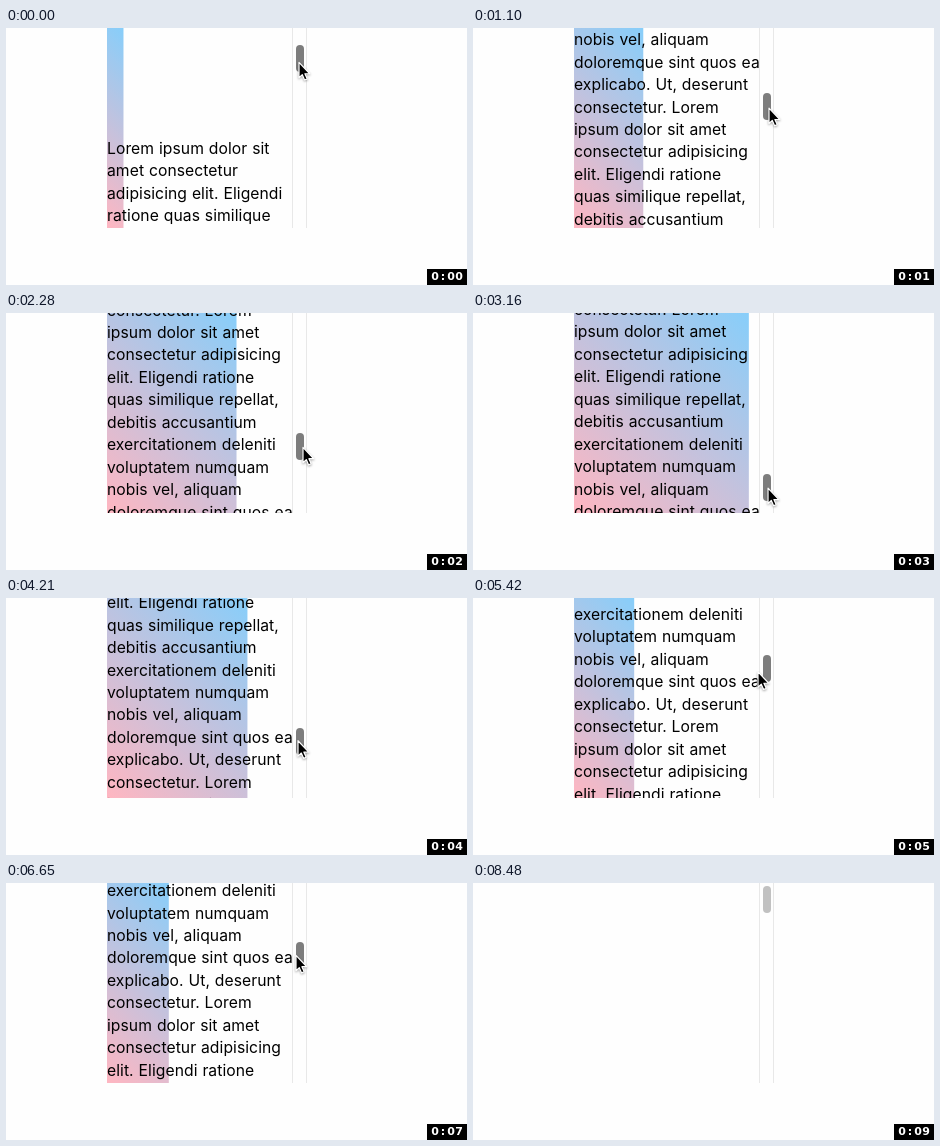
An HTML page that plays this animation: 461x257 px, repeating every 8870 ms.

```html
<!DOCTYPE html>
<html lang="en">
<head>
<meta charset="utf-8">
<title>Scroll-driven width</title>
<style>
  html, body { margin: 0; width: 100%; height: 100%; overflow: hidden; background: #fefefe; }
  svg { display: block; }
  #copy { font: 15.7px Inter, sans-serif; letter-spacing: .06px; word-spacing: .4px; }
  #cursor { filter: drop-shadow(0 1px 1px rgba(0, 0, 0, .35)); }
  #clock { font: bold 11px "DejaVu Sans", sans-serif; fill: #fff; text-anchor: middle; }
</style>
</head>
<body>
<svg width="461" height="257" viewBox="0 0 461 257">
  <defs>
    <linearGradient id="sky" gradientUnits="userSpaceOnUse">
      <stop offset="0" stop-color="#ffb6c1"/>
      <stop offset="1" stop-color="#87cefa"/>
    </linearGradient>
    <clipPath id="view"><rect x="100" width="186" height="200"/></clipPath>
  </defs>
  <rect width="461" height="257" fill="#fefefe"/>
  <rect id="bar" x="101" height="200" fill="url(#sky)"/>
  <g clip-path="url(#view)"><text id="copy"></text></g>
  <path d="M286.5 0V200M300.5 0V200" stroke="#e8e8e8"/>
  <rect id="thumb" x="290" width="8" height="27" rx="4"/>
  <g id="cursor">
    <path d="M0 -.8V14.6L3.3 11.5L5.6 16.8L8.2 15.7L5.9 10.6H10.8Z" stroke="#fff" stroke-width="1.2" stroke-linejoin="round"/>
  </g>
  <rect x="421" y="241" width="40" height="16"/>
  <text id="clock" x="429 437 445 453" y="252"></text>
</svg>
<script>
const $ = id => document.getElementById(id);
const LOOP = 8870, VIEW = 200, WIDTH = 185, LINE = 22.45, MAX = 45 * LINE;

const intro = ["Lorem ipsum dolor sit", "amet consectetur", "adipisicing elit. Eligendi",
  "ratione quas similique", "repellat, debitis", "accusantium"];
const cycle = ["exercitationem deleniti", "voluptatem numquam", "nobis vel, aliquam",
  "doloremque sint quos ea", "explicabo. Ut, deserunt", "consectetur. Lorem",
  "ipsum dolor sit amet", "consectetur adipisicing", "elit. Eligendi ratione",
  "quas similique repellat,", "debitis accusantium"];
const lines = [...intro, ...cycle, ...cycle, ...cycle, ...cycle.slice(0, 5), "consectetur."];

lines.forEach((line, i) => {
  const span = document.createElementNS("http://www.w3.org/2000/svg", "tspan");
  span.setAttribute("x", 101);
  span.setAttribute("y", VIEW + 15.9 + i * LINE);
  span.textContent = line;
  $("copy").append(span);
});

// time, scroll offset, scroll speed, pointer x, grip offset on the thumb
const keys = [
  [90, 90, .285, 293, 17.2],
  [1100, 378, .28, 296, 15],
  [2280, 707, .26, 297, 14.5],
  [3620, MAX, 0, 294, 14],
  [3770, MAX, 0, 294, 14],
  [4210, 767.5, -.6, 292, 13],
  [5420, 329, -.36, 285, 17],
  [6650, 338, -.54, 290, 14],
  [7270, 0, -.3, 292, 15]
];
const ticks = [980, 1890, 2780, 3770, 4660, 5550, 6440, 7480, 8480];
const LEAVE = 7450, GONE = 7920;

const mix = (a, b, u) => a + (b - a) * u;
const clamp = u => Math.max(0, Math.min(1, u));

function hermite(p, v, q, w, d, u) {
  const s = 1 - u;
  return s * s * (1 + 2 * u) * p + u * u * (3 - 2 * u) * q + d * u * s * (s * v - u * w);
}

function pose(t) {
  const next = keys.findIndex(k => k[0] > t);
  const n = next < 0 ? keys.length - 1 : Math.max(1, next);
  const [t0, s0, v0, x0, g0] = keys[n - 1], [t1, s1, v1, x1, g1] = keys[n];
  const u = clamp((t - t0) / (t1 - t0));
  return {
    scroll: hermite(s0, v0, s1, v1, t1 - t0, u),
    x: mix(x0, x1, u),
    grip: mix(g0, g1, u)
  };
}

function set(id, attrs) {
  for (const name in attrs) $(id).setAttribute(name, attrs[name]);
}

function draw(t) {
  const { scroll, x, grip } = pose(t);
  const w = WIDTH * scroll / MAX, r = (w + VIEW) / 4;
  const cx = 101 + w / 2, cy = VIEW / 2;
  const top = 3 + 168 * scroll / MAX;
  const out = clamp((t - LEAVE) / (GONE - LEAVE));
  const y = top + grip + 242 * out * out;

  set("bar", { width: w });
  set("sky", { x1: cx - r, y1: cy + r, x2: cx + r, y2: cy - r });
  set("copy", { transform: `translate(0 ${-scroll})` });
  set("thumb", { y: Math.floor(top), fill: y > top + 27 ? "#c1c1c1" : "#7d7d7d" });
  set("cursor", {
    transform: `translate(${x + 6 * out} ${y})`,
    visibility: t < GONE ? "visible" : "hidden"
  });
  $("clock").textContent = "0:0" + ticks.filter(k => k <= t).length;
}

const start = performance.now();
function frame() {
  draw((performance.now() - start) % LOOP);
  requestAnimationFrame(frame);
}
frame();
</script>
</body>
</html>
```
